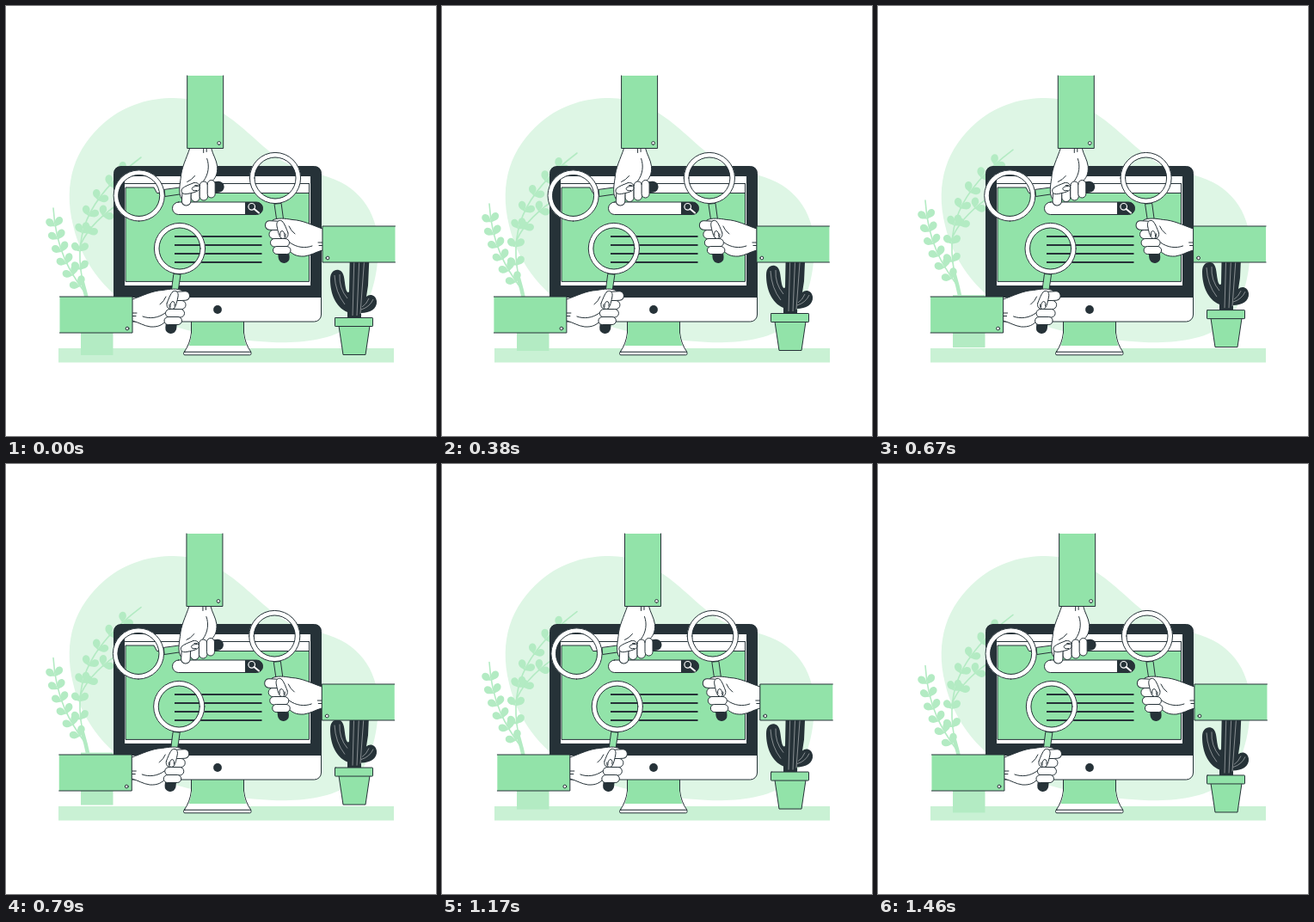
Write an HTML page that moves like this. It is 500x500 px and loops after 1.5 s.

```html
<!DOCTYPE html>
<html lang="en">
<head>
<meta charset="utf-8">
<title>Search</title>
<style>
  html, body { margin: 0; width: 100%; height: 100%; overflow: hidden; background: #fff; }
  svg { display: block; width: 100%; height: 100%; }
  .line { stroke: #263238; stroke-width: 1; stroke-linejoin: round; stroke-linecap: round; }
  .green { fill: #92e3a9; }
  .white { fill: #fff; }
  .dark { fill: #263238; }
  .none { fill: none; }
  .pale { fill: #b3ebc3; }
  .stem { fill: none; stroke: #b3ebc3; stroke-linecap: round; }
</style>
</head>
<body>
<svg viewBox="0 0 500 500">
  <defs>
    <g id="arm">
      <circle cx="202" cy="282" r="27" class="none" stroke="#fff" stroke-width="5.6"/>
      <circle cx="202" cy="282" r="29.6" class="none line"/>
      <circle cx="202" cy="282" r="24" class="none line" stroke-width="1.3"/>
      <path d="M195.3 311.5L203 312.2L199.5 336H192Z" class="green line"/>
      <path d="M192.6 366L191.8 374.5" stroke="#263238" stroke-width="13" stroke-linecap="round"/>
      <path d="M147 341C159 337 170 331 182 330.500C191 329 199 328 205 331L204 352L187 365C182 371 177 373.500 168 373C160 372 155 368 147 366Z" class="white line"/>
      <g class="white line">
        <rect x="193" y="332" width="20.500" height="10.500" rx="5" transform="rotate(-3 203 337)"/>
        <rect x="187" y="342.500" width="22" height="10" rx="4.800"/>
        <rect x="185.500" y="352.500" width="22" height="9.500" rx="4.700"/>
        <rect x="184" y="361.500" width="20.500" height="9" rx="4.500"/>
        <path d="M187 346C189 341 191 335 194 332C198 330 201 333 200 338C199 343 198 348 196 351C193 354 189 352 190 347"/>
      </g>
      <path d="M191 350Q191 344 194 343.500Q197 344 196 349M159 361C167 364 177 363 185 357M179 347Q184 343 186 338M147 357h5M147 360.500h4" class="none line" stroke-width=".8"/>
      <path d="M62.500 338H147V380H62.500" class="green line"/>
      <circle cx="141" cy="375" r="1.900" class="white line"/>
    </g>
  </defs>

  <path fill="#def6e5" d="M195 107C245 107 275 143 305 168C330 190 350 191 375 199C415 212 434 245 433 285C431 325 420 355 400 372C378 390 335 392 310 391C250 388 200 377 165 361C120 340 88 300 78 255C66 205 80 165 115 135C140 114 168 107 195 107Z"/>
  <rect x="61" y="398" width="390" height="16.500" fill="#c9f1d4"/>

  <g class="float" id="plant">
    <rect x="87" y="345" width="37.500" height="61" class="pale"/>
    <path d="M96 350Q93 335 88 318" class="stem" stroke-width="4.500"/>
  </g>

  <g id="monitor">
    <path d="M215.500 366V380Q214 393 207 402.500H285Q278 393 276.500 380V366Z" class="white line"/>
    <path d="M216 367V380Q215.500 388 212.500 395H279.500Q276.500 388 276 380V367Z" class="green"/>
    <rect x="206.500" y="402.200" width="78.500" height="3.600" rx="1.500" class="white line"/>
    <rect x="125.500" y="186.500" width="241" height="180.500" rx="8" class="white line"/>
    <path d="M125.500 339V194.500Q125.500 186.500 133.500 186.500H358.500Q366.500 186.500 366.500 194.500V339Z" class="dark"/>
    <circle cx="246" cy="353" r="4.900" class="dark"/>
    <rect x="138" y="198" width="216" height="127" class="white"/>
    <path d="M138.500 206.500H352.500" class="line"/>
    <path d="M139 320V211H172L175.500 217.500H352.500V320Z" class="green line"/>
    <path d="M352.500 206.500V218" class="line"/>
    <rect x="193.500" y="228" width="105" height="14.500" rx="7.200" class="white line" stroke-width=".8"/>
    <path d="M278 228H291.500A7.200 7.200 0 0 1 291.500 242.500H278Z" class="dark"/>
    <path d="M288.500 236L294 240.500" stroke="#fff" stroke-width="2" stroke-linecap="round"/>
    <circle cx="285.700" cy="233.300" r="3.800" class="none" stroke="#fff" stroke-width="1.200"/>
    <path d="M196 268H297.500M196 278H297.500M196 288H297.500M196 298H297.500" stroke="#263238" stroke-width="2"/>
  </g>

  <g class="float">
    <path class="dark" d="M400 280H423L421 325L419 338C423 334 430 336 431 343C432 352 423 357 413 357L413 364H397V356C383 350 377 334 377 318C377 309 382 306 387 307C394 309 393 318 395 328C396 333 398 334 399 332Z"/>
    <path class="none" stroke="#fff" stroke-width=".6" opacity=".75" d="M405 290L403 360M411 290L408 360M417 290L412 358M382 313Q383 333 394 347M388 312Q387 328 397 340M427 341Q423 350 413 353M422 340Q419 347 414 350"/>
    <path d="M387 372L392 405.500H418L423 372Z" class="green line"/>
    <rect x="382.500" y="362.500" width="44" height="10" rx=".6" class="green line"/>
  </g>

  <g id="arms">
    <use href="#arm" transform="matrix(0 1 1 0 -127.300 18.500)"/>
    <use href="#arm"/>
    <use href="#arm" transform="matrix(-1 0 0 1 515 -82)"/>
  </g>
</svg>

<script>
const plant = document.getElementById('plant');
const arms = document.getElementById('arms');
const floats = document.querySelectorAll('.float');

function add(tag, attrs) {
  const el = document.createElementNS('http://www.w3.org/2000/svg', tag);
  for (const key in attrs) el.setAttribute(key, attrs[key]);
  plant.append(el);
  return el;
}

// A thin stem with pairs of leaves at even steps along it.
function sprig(d, pairs, from, to) {
  const stem = add('path', { d, class: 'stem', 'stroke-width': 1.6 });
  const length = stem.getTotalLength();
  for (let i = 0; i < pairs; i++) {
    const at = length * (from + (to - from) * i / (pairs - 1));
    const p = stem.getPointAtLength(at);
    const q = stem.getPointAtLength(at + 1);
    const angle = Math.atan2(q.y - p.y, q.x - p.x) * 180 / Math.PI;
    for (const side of [-42, 42]) {
      add('path', {
        class: 'pale',
        d: 'M0 0C3-1 4-4.500 8-4.500C14-4.500 15 3 9 4C5 4.500 3 1 0 0Z',
        transform: `translate(${p.x} ${p.y}) rotate(${angle + side})`
      });
    }
  }
}
sprig('M93 335C76 312 58 285 55 235', 6, 0.1, 0.8);
sprig('M91 328C76 270 92 225 157 176', 7, 0.12, 0.84);
sprig('M85 282Q94 256 128 232', 2, 0.3, 0.7);

// Cubic bezier easing (.36, .07, .19, .97), solved by bisection.
function ease(x) {
  const curve = (s, a, b) => 3 * (1 - s) ** 2 * s * a + 3 * (1 - s) * s * s * b + s ** 3;
  let lo = 0, hi = 1;
  for (let i = 0; i < 24; i++) {
    const mid = (lo + hi) / 2;
    if (curve(mid, 0.36, 0.19) < x) lo = mid; else hi = mid;
  }
  return curve(lo, 0.07, 0.97);
}

const LOOP = 1500, STEPS = 36;
const SHAKE = [0, -1, 2, -3.2, 3.2, -3.2, 3.2, -3.2, 2, -1, 0];

function draw(ms) {
  // 24 steps per second, with a few ms of slack for rounded delays
  const phase = Math.floor((ms % LOOP + 4) * STEPS / LOOP) % STEPS / STEPS;
  const key = Math.floor(phase * 10 + 1e-6);
  const x = SHAKE[key] + (SHAKE[key + 1] - SHAKE[key]) * ease(phase * 10 - key);
  const y = -10 * (1 - Math.abs(1 - 2 * phase));
  arms.setAttribute('transform', `translate(${x} 0)`);
  floats.forEach(el => el.setAttribute('transform', `translate(0 ${y})`));
}

const start = performance.now();
function tick() {
  draw(performance.now() - start);
  requestAnimationFrame(tick);
}
tick();
</script>
</body>
</html>
```
